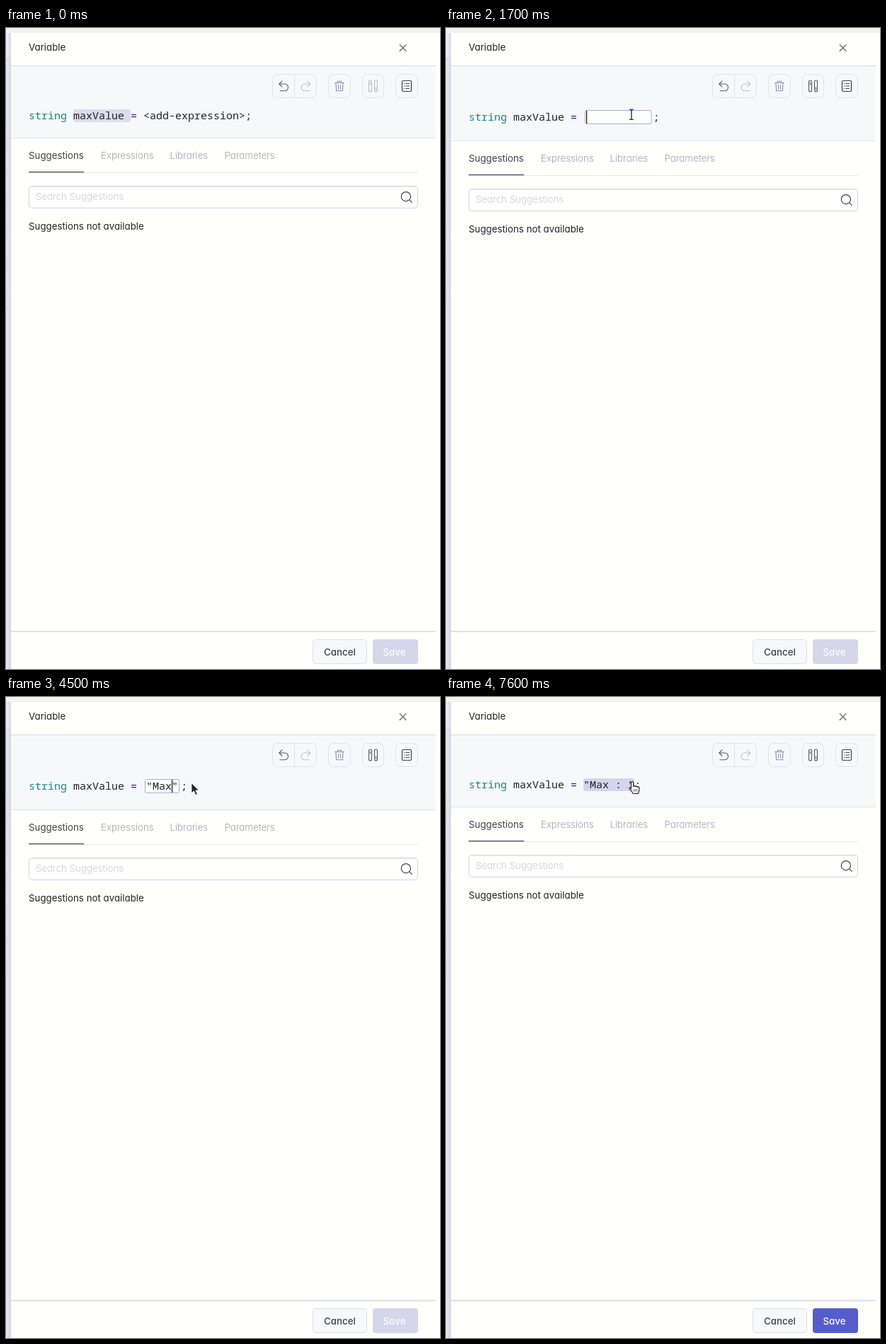
Animation of 613x906 px, one loop 8 s. Source, as an HTML page:

```html
<!DOCTYPE html>
<html lang="en">
<head>
<meta charset="utf-8">
<title>Variable editor</title>
<style>
  html, body { margin: 0; width: 100%; height: 100%; overflow: hidden; background: #fffffc; }
  svg { display: block; }
  text { font: 400 13.3px Inter, sans-serif; font-feature-settings: "cv11"; fill: #222228; white-space: pre; }
  .code text { font: 400 15px "Noto Sans Mono", monospace; }
  .muted text { font-weight: 300; fill: #a2a2b2; }
  .btn text { font-weight: 500; }
  .line { fill: none; stroke-linecap: round; stroke-linejoin: round; }
  .frames rect { fill: #f7f8fa; stroke: #e0e2e9; }
</style>
</head>
<body>
<svg width="613" height="906" viewBox="0 0 613 906">
  <defs>
    <linearGradient id="shade">
      <stop offset="0" stop-color="#d0d0e0" stop-opacity="0"/>
      <stop offset="1" stop-color="#c8c8d8" stop-opacity=".6"/>
    </linearGradient>
    <path id="back" d="M390 74.8L385.8 79L390 83.2M386 79H393.6a4.9 4.9 0 0 1 0 9.8H387"/>
  </defs>

  <rect width="613" height="906" fill="#fffffc"/>
  <rect y="7" width="7" height="899" fill="#e7e7ef"/>
  <rect y="7" width="7" height="36" fill="#efeff4"/>
  <path d="M0 43.5H7M0 134.5H7M0 397.5H7" stroke="#dadae5"/>
  <path d="M1 138V397" stroke="#c9c9d6" stroke-dasharray="1 4"/>
  <rect y="7" width="7" height="899" fill="url(#shade)"/>
  <rect width="613" height="7" fill="#f2f2ee"/>

  <text x="32" y="32">Variable</text>
  <path class="line" d="M556.3 23.8l8.6 8.6m0-8.6l-8.6 8.6" stroke="#767784" stroke-width="1.5"/>

  <rect id="band" x="7" y="54" width="600" height="101" fill="#f7f8f9"/>
  <path d="M7 53.5H607" stroke="#d5dadb"/>

  <g class="frames">
    <rect x="376.5" y="65.5" width="62" height="33" rx="7"/>
    <path d="M407.5 66V98" stroke="#e0e2e9"/>
    <rect x="455.5" y="65.5" width="31" height="33" rx="7"/>
    <rect x="503.5" y="65.5" width="30" height="33" rx="7"/>
    <rect x="550.5" y="65.5" width="31" height="33" rx="7"/>
  </g>
  <g class="line" stroke-width="1.1">
    <use href="#back" stroke="#5b5b67"/>
    <use href="#back" stroke="#c0c0ca" transform="matrix(-1 0 0 1 815.6 0)"/>
    <path d="M464.5 77.5H477.5M468.5 77.2V75.2H473.5V77.2M466 77.8L466.6 88.8H475.4L476 77.8M469.5 80.5V86M472.5 80.5V86" stroke="#8d8ea2"/>
    <path id="cols" d="M512.5 76a2 2 0 0 1 4 0V88a2 2 0 0 1-4 0zM520.5 76a2 2 0 0 1 4 0V88a2 2 0 0 1-4 0zM514.5 77V80M522.5 84V87"/>
    <path d="M561 74.5H571a1.5 1.5 0 0 1 1.5 1.5V88a1.5 1.5 0 0 1-1.5 1.5H561a1.5 1.5 0 0 1-1.5-1.5V76a1.5 1.5 0 0 1 1.5-1.5zM565 78.5H569.5M565 82H569.5M565 85.5H569.5M562.3 78.5h.4M562.3 82h.4M562.3 85.5h.4" stroke="#40404b" stroke-width="1.2"/>
  </g>

  <g id="code" class="code">
    <rect id="nameMark" x="95" y="115" width="81" height="18" rx="3.5" fill="#dcdcee"/>
    <rect id="exprMark" x="194" y="115" height="18" rx="3.5"/>
    <rect id="field" x="196.5" y="114.5" height="19" rx="2" fill="#fffffe" stroke="#a9a8e2"/>
    <text x="32" y="129" style="fill:#128a78">string</text>
    <text x="95" y="129">maxValue</text>
    <text x="176" y="129" style="fill:#1a1a96">=</text>
    <text id="expr" y="129"></text>
    <text id="semi" y="129">;</text>
    <rect id="caret" y="115" width="1.2" height="18" fill="#111"/>
  </g>

  <g id="error">
    <circle cx="40" cy="164" r="8.2" fill="#c05253"/>
    <path class="line" d="M38 162l4 4m0-4l-4 4" stroke="#fff"/>
    <text x="54" y="168" style="fill:#cc3d4c">missing double quote</text>
  </g>

  <g id="lower">
    <path d="M7 155.5H607" stroke="#e0e4ea"/>
    <text x="32" y="185" style="fill:#40404b">Suggestions</text>
    <g class="muted">
      <text x="134" y="185">Expressions</text>
      <text x="231.5" y="185">Libraries</text>
      <text x="308.5" y="185">Parameters</text>
    </g>
    <path d="M110 204.5H582" stroke="#e6e7ec"/>
    <path d="M32 203.7H110" stroke="#40404b" stroke-width="1.3"/>
    <rect x="32.5" y="223.5" width="549" height="31" rx="4" fill="#fffffe" stroke="#d3d5e0"/>
    <path d="M35 224.7H579" stroke="#e9eaef"/>
    <text x="42" y="243" style="fill:#cbcbd6;font-weight:300">Search Suggestions</text>
    <path class="line" d="M571.5 238.2a6.6 6.6 0 1 1-13.2 0a6.6 6.6 0 1 1 13.2 0M569.6 242.9L573.3 246.4" stroke="#40404b" stroke-width="1.2"/>
    <text x="32" y="285">Suggestions not available</text>
  </g>

  <path d="M7 853H607" stroke="#e0e3e6" stroke-width="2"/>
  <g class="btn">
    <rect x="433.5" y="864.5" width="76" height="34" rx="4" fill="#f7f8fa" stroke="#dcdee6"/>
    <text x="449" y="887" style="fill:#40404b">Cancel</text>
    <rect id="save" x="518" y="864" width="64" height="35" rx="4"/>
    <text x="532.5" y="887" style="fill:#fcfcff">Save</text>
  </g>

  <g id="arrow"><path d="M0 0V14.5l3.4-3.2 2.5 5.7 2.5-1.1-2.5-5.4h4.4z" fill="#222" stroke="#fff" stroke-width=".8"/></g>
  <g id="beam"><path class="line" d="M-2.5 0Q0 0 0 1.5Q0 0 2.5 0M0 1.5V13M-2.5 14.5Q0 14.5 0 13Q0 14.5 2.5 14.5" stroke="#111" stroke-width="1.2"/></g>
  <g id="hand">
    <path d="M4 11V2.2a1.6 1.6 0 0 1 3.2 0V7.5a1.5 1.5 0 0 1 2.8.3a1.5 1.5 0 0 1 2.7.6a1.4 1.4 0 0 1 2.6.9V12.5c0 1.5-1 2.5-1 5H6.5C6 15 3.5 13 1.6 10.6c-1-1.5 1-2.6 2.4-.6z" fill="#fff" stroke="#222" stroke-width="1.2" stroke-linejoin="round"/>
    <path d="M8 11.5v3M10.2 11.5v3M12.4 11.5v3" stroke="#222" stroke-width=".8"/>
  </g>
</svg>

<script>
const LOOP = 8000, CELL = 9;
const HOVER = '#e7e8ec', PICKED = '#d4d4ee';
const $ = id => document.getElementById(id);
const set = (id, attrs) => { for (const k in attrs) $(id).setAttribute(k, attrs[k]); };
const show = (id, on) => set(id, { visibility: on ? 'visible' : 'hidden' });

// Each step changes only the listed properties; the rest carries over.
const steps = [
  { at: 0, text: '<add-expression>', mark: '', name: true, edit: false, error: false,
    caret: -1, cols: '#b9b9c4', save: '#d5d6ea', pointer: ['', 0, 0] },
  { at: 600, mark: HOVER, pointer: ['hand', 264, 85] },
  { at: 800, mark: '', pointer: ['arrow', 271, 149] },
  { at: 900, mark: HOVER, pointer: ['hand', 264, 131] },
  { at: 1000, pointer: ['hand', 263, 127.5] },
  { at: 1400, mark: PICKED, name: false, cols: '#555561' },
  { at: 1500, pointer: ['hand', 257.5, 119] },
  { at: 1700, text: '', edit: true, caret: 0, pointer: ['beam', 262, 115] },
  { at: 2900, text: '"', caret: 1 },
  { at: 3000, pointer: ['arrow', 262, 121.5] },
  { at: 3300, text: '""' },
  { at: 3700, error: true },
  { at: 3800, error: false },
  { at: 4000, text: '"M"', caret: 2 },
  { at: 4200, text: '"Ma"', caret: 3 },
  { at: 4500, text: '"Max"', caret: 4 },
  { at: 5100, text: '"Max "', caret: 5 },
  { at: 5300, caret: -1 },
  { at: 5800, pointer: ['hand', 257.5, 119] },
  { at: 6000, text: '"Max : "', caret: 7 },
  { at: 6500, caret: -1 },
  { at: 7400, edit: false, mark: PICKED },
  { at: 7500, save: '#959ada' },
  { at: 7600, save: '#565dcb' }
];
for (let i = 1; i < steps.length; i++) steps[i] = { ...steps[i - 1], ...steps[i] };

function draw(s) {
  const wide = s.text.length * CELL;
  const right = s.text ? 199.5 + wide : 290;
  const shift = s.error ? 32 : s.edit ? 4 : 0;

  set('code', { transform: `translate(0 ${s.edit ? 2 : 0})` });
  set('lower', { transform: `translate(0 ${shift})` });
  set('band', { height: 101 + shift });

  $('expr').textContent = s.text;
  set('expr', { x: s.edit ? 198 : 194 });
  set('semi', { x: s.edit ? right + 2.5 : 194 + wide });
  set('field', { width: right - 196.5 });
  set('exprMark', { width: wide, fill: s.mark || 'none' });
  set('caret', { x: 198 + s.caret * CELL });
  set('cols', { stroke: s.cols });
  set('save', { fill: s.save });

  show('nameMark', s.name);
  show('exprMark', !s.edit && s.mark);
  show('field', s.edit);
  show('caret', s.edit && s.caret >= 0);
  show('error', s.error);

  const [kind, x, y] = s.pointer;
  for (const id of ['arrow', 'beam', 'hand']) {
    show(id, id === kind);
    set(id, { transform: `translate(${x} ${y})` });
  }
}

let last;
function tick() {
  const t = performance.now() % LOOP;
  const now = steps.findLast(s => s.at <= t);
  if (now !== last) draw(last = now);
  requestAnimationFrame(tick);
}
tick();
</script>
</body>
</html>
```
